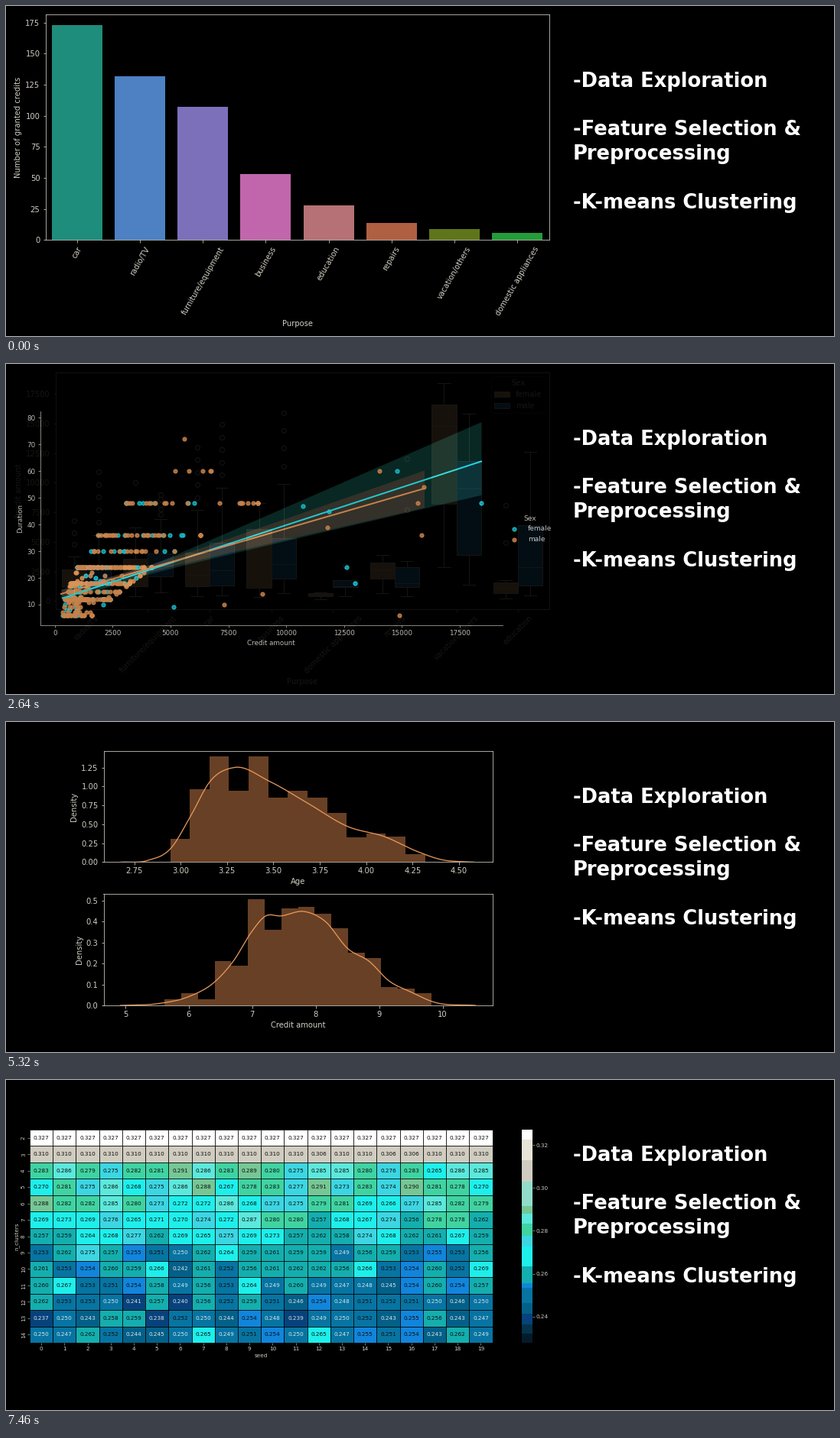
A matplotlib script that plays this animation: 1082 px wide and 432 px high, repeating every 8000 ms.

```python
import matplotlib.pyplot as plt
import numpy as np
from matplotlib.animation import FuncAnimation
from matplotlib.colors import BoundaryNorm, ListedColormap
from matplotlib.patches import Patch

W, H, DPI = 1082, 432, 72
INTERVAL, LOOP = 20, 8000
FIRST_FADE, FADE_EVERY, STEP, STEPS = 500, 2140, 60, 10
INK = "#d0cdc2"

plt.rcParams.update({
    "font.family": "DejaVu Sans",
    "figure.facecolor": "black",
    "axes.facecolor": "none",
    **{key: INK for key in ("text.color", "axes.labelcolor", "axes.edgecolor",
                            "xtick.color", "ytick.color")},
})
fig = plt.figure(figsize=(W / DPI, H / DPI), dpi=DPI)


def add_axes(left, top, right, bottom, size=10, xlabel="", ylabel="", **props):
    """Axes placed by stage pixels, with ticks and labels scaled to the font size."""
    ax = fig.add_axes([left / W, 1 - bottom / H, (right - left) / W, (bottom - top) / H])
    ax.set(**props)
    ax.tick_params(labelsize=size, length=.35 * size, width=.08 * size, pad=.35 * size)
    ax.set_xlabel(xlabel, size=size, labelpad=.4 * size)
    ax.set_ylabel(ylabel, size=size, labelpad=.4 * size)
    for spine in ax.spines.values():
        spine.set_linewidth(.08 * size)
    return ax


def smooth(points, count=400):
    """Cubic Hermite curve through (x, y) points."""
    xs, ys = np.array(points).T
    slopes = np.gradient(ys, xs)
    x = np.linspace(xs[0], xs[-1], count)
    i = np.clip(np.searchsorted(xs, x) - 1, 0, len(xs) - 2)
    h = xs[i + 1] - xs[i]
    t = (x - xs[i]) / h
    y = ((1 + 2 * t) * (1 - t) ** 2 * ys[i] + t * (1 - t) ** 2 * h * slopes[i]
         + t * t * (3 - 2 * t) * ys[i + 1] + t * t * (t - 1) * h * slopes[i + 1])
    return x, np.maximum(y, 0)


# Credits per purpose

def bar_slide():
    names = ["car", "radio/TV", "furniture/equipment", "business", "education",
             "repairs", "vacation/others", "domestic appliances"]
    counts = [173, 132, 107, 53, 28, 14, 9, 6]
    colors = ["#1f8d7b", "#4d81c4", "#7c70bb", "#c166ac",
              "#b57175", "#b06042", "#5f751c", "#259b39"]
    ax = add_axes(51.5, 11, 709.5, 306.4, xlabel="Purpose",
                  ylabel="Number of granted credits",
                  xlim=(-.5, 7.5), ylim=(0, 181.65), yticks=range(0, 176, 25))
    ax.bar(range(8), counts, .8, color=colors)
    ax.set_xticks(range(8), names, rotation=60)


# Duration against credit amount; points are (stage x, months)

ROUND_DURATIONS = {6: 36, 12: 76, 15: 34, 18: 60, 24: 90, 30: 24, 36: 36, 48: 30, 60: 5}
FAR_MEN = [(233, 72), (488, 60), (546, 54), (538, 48), (420, 39), (543, 36),
           (335, 14), (285, 10), (514, 6)]
FAR_WOMEN = [(511, 60), (621, 48), (388, 47), (422, 45), (445, 24), (456, 18), (219, 9)]


def credit(x):
    return (x - 63.8) * 33.07


def duration(y):
    return 10 + (315 - y) / 3.493


def loans(seed=5):
    """Longer loans start at higher amounts and spread wider."""
    rng = np.random.default_rng(seed)
    months = np.repeat(list(ROUND_DURATIONS), list(ROUND_DURATIONS.values()))
    months = np.concatenate([months, rng.integers(7, 23, 80)])
    spread = rng.exponential(8 + 1.9 * months)
    x = 72 + .036 * months ** 2 + np.minimum(spread, 3.2 * months + 20)
    female = rng.random(len(x)) < .25
    points = np.column_stack([x, months])
    return points[female], points[~female]


def scatter_slide():
    ax = add_axes(44.5, 62, 648.5, 342, 8.8, "Credit amount", "Duration",
                  xlim=(credit(44.5), credit(648.5)), ylim=(duration(342), duration(62)),
                  xticks=range(0, 17501, 2500), yticks=range(10, 81, 10))
    ax.spines[["top", "right"]].set_visible(False)

    women, men = loans()
    # points, face, line, band, line start and end, widening above and below
    groups = [
        (np.vstack([women, FAR_WOMEN]), "#12bfd2", "#22dfe6", "#0a2b27",
         (74, 306.5), (621, 127.5), .11, .0925),
        (np.vstack([men, FAR_MEN]), "#dc8f52", "#dc8f52", "#39362e",
         (72, 301), (546.5, 163), .06, .062),
    ]
    dots = []
    for z, (points, face, edge, band, start, end, up, down) in enumerate(groups):
        x = np.linspace(start[0], end[0], 120)
        y = np.interp(x, [start[0], end[0]], [start[1], end[1]])
        ax.fill_between(credit(x), duration(y - np.hypot(4, up * (x - 150))),
                        duration(y + np.hypot(4, down * (x - 150))),
                        color=band, lw=0, zorder=z)
        px, months = points.T
        dots.append(ax.scatter(credit(px), months, s=25, c=face, edgecolors=edge,
                               lw=1.2, alpha=.85, zorder=2 + z))
        ax.plot(credit(x), duration(y), color=edge, lw=2, zorder=5 + z)
    ax.legend(dots, ["female", "male"], title="Sex", fontsize=9, title_fontsize=9,
              frameon=False, loc="center left", borderaxespad=0, handletextpad=1,
              bbox_to_anchor=(651.5 / W, 1 - 216 / H), bbox_transform=fig.transFigure)


# Credit amount per purpose and sex, in thousands:
# lower quartile, median, upper quartile, whisker, then outlier count and maximum

BOXES = {
    "radio/TV": [(1.2, 1.8, 2.7, 3.8, 3, 6.8), (1.1, 1.9, 3, 5.6, 5, 10.9)],
    "furniture/equipment": [(1.25, 2.3, 3.6, 6.2, 1, 10), (2.1, 3, 4, 6.9, 5, 9)],
    "car": [(1.25, 2.2, 4.1, 7.7, 5, 13), (1.3, 2.6, 4.9, 9.6, 5, 14.9)],
    "business": [(1.1, 4.25, 6.1, 8.3), (1.9, 3.1, 5.3, 9.9, 4, 15.9)],
    "domestic appliances": [(.4, .55, .65, .75), (1.2, 1.25, 1.8, 1.8, 1, 3)],
    "repairs": [(1.9, 2.7, 3.25, 3.9), (1.2, 1.5, 2.9, 3.4, 2, 12)],
    "vacation/others": [(8.25, 14.8, 16.6, 18.4), (3.9, 9.5, 11.8, 15.8)],
    "education": [(.65, 1.1, 1.6, 1.8, 2, 8.1), (1.3, 2.9, 6.4, 12.6)],
}


def box_stats(q1, med, q3, high, count=0, top=0):
    outliers = np.linspace(top, high, count, endpoint=False) if count else []
    return dict(whislo=350 * q1, q1=1000 * q1, med=1000 * med, q3=1000 * q3,
                whishi=1000 * high, fliers=1000 * np.array(outliers))


def box_slide():
    ax = add_axes(64.5, 11, 709.5, 320.5, xlabel="Purpose", ylabel="Credit amount",
                  xlim=(-.5, 7.5), ylim=(-645, 19306), yticks=range(0, 17501, 2500))
    colors = {"female": "#e7aa70", "male": "#217fcc"}
    line = dict(color=INK, lw=1)
    for side, color in enumerate(colors.values()):
        ax.bxp([box_stats(*pair[side]) for pair in BOXES.values()],
               positions=np.arange(8) - .2 + .4 * side, widths=.4,
               patch_artist=True, manage_ticks=False,
               boxprops=dict(facecolor=color, edgecolor=INK, lw=1),
               medianprops=line, whiskerprops=line, capprops=line,
               flierprops=dict(marker="o", markersize=6, markerfacecolor="none",
                               markeredgecolor=INK))
    ax.set_xticks(range(8), list(BOXES), rotation=45)
    patches = [Patch(facecolor=c, edgecolor=INK, lw=.8, label=name)
               for name, c in colors.items()]
    ax.legend(handles=patches, title="Sex", fontsize=10, title_fontsize=10,
              loc="upper right", facecolor="black", edgecolor="#383838")


# Distributions after the log transform

AGE_BINS = [.305, .96, 1.4, .94, 1.4, .855, .94, .855, .653, .325, .38, .34, .105]
AGE_CURVE = [(2.68, 0), (2.82, .02), (2.95, .19), (3.05, .59), (3.16, 1.07),
             (3.29, 1.25), (3.48, 1.065), (3.69, .77), (3.9, .47), (4.1, .335),
             (4.27, .145), (4.4, .035), (4.58, 0)]
CREDIT_BINS = [.029, .058, .029, .211, .189, .504, .36, .462, .469, .438, .367,
               .251, .2255, .087, .08, .058]
CREDIT_CURVE = [(4.92, 0), (5.5, .008), (6, .042), (6.4, .11), (6.7, .21), (7, .355),
                (7.2, .424), (7.45, .426), (7.82, .447), (8.15, .4), (8.5, .272),
                (8.85, .208), (9.15, .118), (9.5, .064), (9.85, .017), (10.52, 0)]


def density(ax, bins, first, last, curve):
    ax.stairs(bins, np.linspace(first, last, len(bins) + 1), fill=True, color="#684025")
    ax.plot(*smooth(curve), color="#e8985a", lw=1.3)


def histogram_slide():
    ax = add_axes(127.5, 38, 635.5, 183.4, xlabel="Age", ylabel="Density",
                  xlim=(2.585, 4.679), ylim=(0, 1.467),
                  xticks=np.arange(2.75, 4.6, .25), yticks=np.arange(0, 1.3, .25))
    density(ax, AGE_BINS, 2.944, 4.317, AGE_CURVE)
    ax = add_axes(127.5, 225, 635.5, 371, xlabel="Credit amount", ylabel="Density",
                  xlim=(4.656, 10.784), ylim=(0, .531),
                  xticks=range(5, 11), yticks=np.arange(0, .51, .1))
    density(ax, CREDIT_BINS, 5.621, 9.819, CREDIT_CURVE)


# Silhouette scores

LEVELS = [.2278, .2319, .2365, .2415, .2465, .2535, .2555, .2635, .2727, .2775,
          .2834, .288, .2915, .3029, .3128, .3227, .3272]
SHADES = ["#031a2b", "#04334a", "#07427c", "#046088", "#0774a2", "#1185dc",
          "#14aeae", "#1eefeb", "#3cd6e2", "#40d3a2", "#5ce8dc", "#76c795",
          "#92dccb", "#d0ccc0", "#e7e3d6", "#ffffff"]


def score_grid(seed=3):
    """Scores fall off with the cluster count and vary between seeds."""
    rng = np.random.default_rng(seed)
    clusters = np.arange(2, 15)[:, None]
    centre = .2485 + .033 / (1 + (np.maximum(clusters - 4, 0) / 3.8) ** 3)
    scores = np.clip(rng.normal(centre, .0065, (13, 20)), .228, .292)
    scores[0] = .327
    scores[1] = np.where(rng.random(20) < .15, .306, .310)
    return scores


def heatmap_slide():
    scores = score_grid()
    style = dict(cmap=ListedColormap(SHADES), norm=BoundaryNorm(LEVELS, len(SHADES)))
    ax = add_axes(31, 65, 635.5, 344, 7.2, "seed", "n_clusters")
    ax.pcolormesh(scores, edgecolors="black", lw=.7, antialiased=True, **style)
    ax.set(xlim=(0, 20), ylim=(13, 0))
    ax.set_xticks(np.arange(20) + .5, range(20))
    ax.set_yticks(np.arange(13) + .5, range(2, 15), rotation=90, va="center")
    for (row, col), score in np.ndenumerate(scores):
        ax.text(col + .5, row + .5, f"{score:.3f}", size=7.2, ha="center",
                va="center", color="#d8e2e6" if score < .2505 else "#0c0c0c")

    bar = add_axes(673.5, 65, 687.5, 344, 7.2)
    middles = (np.array(LEVELS[1:]) + LEVELS[:-1]) / 2
    bar.pcolormesh([0, 1], LEVELS, middles[:, None], **style)
    bar.set(xticks=[], yticks=np.arange(.24, .33, .02), ylim=(LEVELS[0], LEVELS[-1]))
    bar.yaxis.tick_right()
    for axes in (ax, bar):
        axes.spines[:].set_visible(False)


def render(build):
    fig.clear()
    build()
    fig.canvas.draw()
    return np.asarray(fig.canvas.buffer_rgba())[..., :3].astype(float)


slides = [render(build) for build in
          (bar_slide, scatter_slide, box_slide, histogram_slide, heatmap_slide)]

fig.clear()
stage = fig.figimage(slides[0].astype(np.uint8))
for baseline, line in [(106, "-Data Exploration"), (169, "-Feature Selection &"),
                       (201, "Preprocessing"), (265, "-K-means Clustering")]:
    fig.text(741 / W, 1 - baseline / H, line, size=25.8, weight="bold",
             color="white", va="baseline")


def update(frame):
    fade, elapsed = divmod(frame * INTERVAL - FIRST_FADE, FADE_EVERY)
    if fade < 0:
        picture = slides[0]
    else:
        mix = min(1, (elapsed // STEP + 1) / STEPS)
        picture = slides[fade] * (1 - mix) + slides[fade + 1] * mix
    stage.set_data(np.rint(picture).astype(np.uint8))
    return [stage]


anim = FuncAnimation(fig, update, frames=LOOP // INTERVAL, interval=INTERVAL,
                     repeat=True, repeat_delay=0)
plt.show()
```
